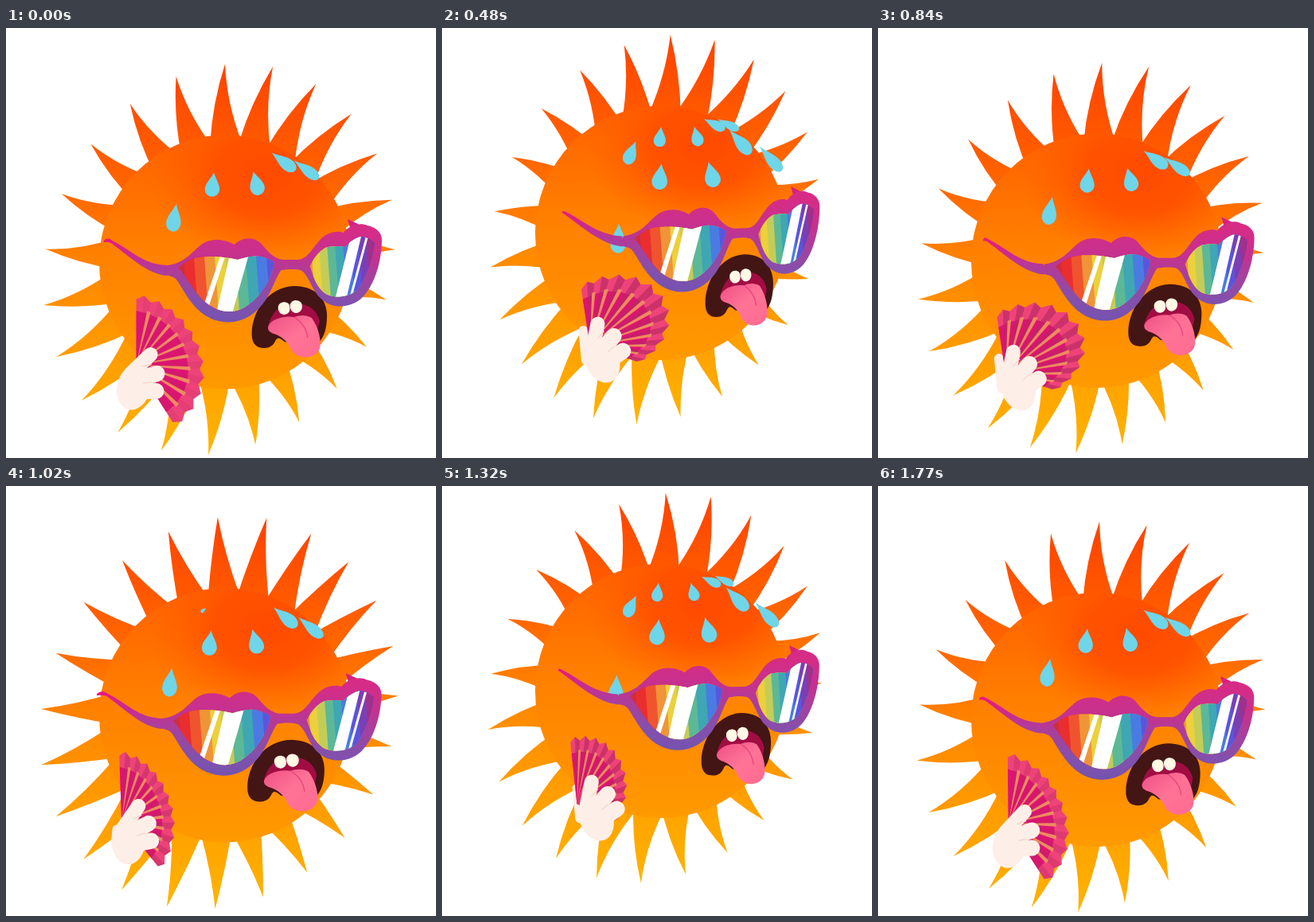
Recreate the animation shown at these times as an HTML page. Size 540 by 540 pixels, loop 1.8 s.

```html
<!DOCTYPE html>
<html lang="en">
<head>
<meta charset="utf-8">
<title>Hot sun</title>
<style>
  html, body { margin: 0; width: 100%; height: 100%; overflow: hidden; background: #fff; }
  svg { display: block; width: 100vw; height: 100vh; }
</style>
</head>
<body>
<svg viewBox="0 0 540 540">
  <defs>
    <linearGradient id="rayFill" gradientUnits="userSpaceOnUse" x1="0" y1="-240" x2="0" y2="240">
      <stop offset="0" stop-color="#ff4400"/>
      <stop offset=".3" stop-color="#ff6500"/>
      <stop offset=".55" stop-color="#ff8a00"/>
      <stop offset="1" stop-color="#ffb400"/>
    </linearGradient>
    <linearGradient id="bodyFill" gradientUnits="userSpaceOnUse" x1="0" y1="-160" x2="0" y2="160">
      <stop offset="0" stop-color="#ff6000"/>
      <stop offset=".45" stop-color="#ff8000"/>
      <stop offset="1" stop-color="#ff9a00"/>
    </linearGradient>
    <radialGradient id="heat" gradientUnits="userSpaceOnUse" cx="0" cy="0" r="1"
        gradientTransform="translate(328 -108) scale(150 110)">
      <stop offset="0" stop-color="#ff4a00"/>
      <stop offset=".45" stop-color="#ff4e00" stop-opacity=".85"/>
      <stop offset="1" stop-color="#ff6000" stop-opacity="0"/>
    </radialGradient>
    <linearGradient id="frameFill" gradientUnits="userSpaceOnUse" x1="0" y1="-40" x2="0" y2="76">
      <stop offset="0" stop-color="#d62c86"/>
      <stop offset=".3" stop-color="#c4328f"/>
      <stop offset=".75" stop-color="#8450ac"/>
      <stop offset="1" stop-color="#7453b0"/>
    </linearGradient>
    <linearGradient id="armFill" gradientUnits="userSpaceOnUse" x1="0" y1="-30" x2="0" y2="18">
      <stop offset="0" stop-color="#ec1580"/>
      <stop offset="1" stop-color="#a244a2"/>
    </linearGradient>
    <linearGradient id="tongueFill" x1="0" y1="0" x2="1" y2="1">
      <stop offset="0" stop-color="#ee4f86"/>
      <stop offset=".5" stop-color="#ff7396"/>
      <stop offset="1" stop-color="#ff6a90"/>
    </linearGradient>
    <clipPath id="lensClip0"><path id="lensShape0"/></clipPath>
    <clipPath id="lensClip1"><path id="lensShape1"/></clipPath>
  </defs>
  <g id="sun">
    <path id="rays" fill="url(#rayFill)"/>
    <ellipse cx="275" cy="0" rx="158" ry="159.5" fill="url(#bodyFill)"/>
    <ellipse cx="275" cy="0" rx="158" ry="159.5" fill="url(#heat)"/>
    <g id="drops" fill="#6fd5e8"></g>
    <g id="mouth"></g>
    <path id="arm" fill="url(#armFill)"/>
    <g id="glasses"></g>
    <g id="fan">
      <path id="thumb" stroke="#fdeee6" stroke-width="12" stroke-linecap="round"/>
      <path id="leaf" fill="#ee4379"/>
      <path id="silk" fill="#dc1472"/>
      <path id="folds" fill="#b82862"/>
      <path id="ribs" fill="#ee8a60"/>
      <g id="hand" fill="#fdefe7" stroke="#fdefe7" stroke-linecap="round">
        <ellipse cx="-8" cy="9" rx="21" ry="29" transform="rotate(14 -8 9)" stroke="none"/>
        <path d="M-12-8L13-32" stroke-width="18"/>
        <path d="M-8 0L21-8M-8 14L20 14" stroke-width="20"/>
        <path d="M3-17Q8-19 14-20M4 4Q9 3 14 3" stroke="#f6d9cf" stroke-width="1.5" fill="none"/>
      </g>
    </g>
  </g>
</svg>
<script>
const LOOP = 1800, STEP = 30, RAYS = 23, PLEATS = 11;
const $ = id => document.getElementById(id);
const rad = deg => deg * Math.PI / 180;
const sin = deg => Math.sin(rad(deg)), cos = deg => Math.cos(rad(deg));
const pt = (x, y) => `${x.toFixed(2)} ${y.toFixed(2)} `;

function add(parent, attrs) {
  const el = document.createElementNS('http://www.w3.org/2000/svg', 'path');
  for (const name in attrs) el.setAttribute(name, attrs[name]);
  return parent.appendChild(el);
}

// Face paths follow the turn of the head: the right side moves less sideways and rises.
const warped = [];
function addWarped(parent, d, fill, extra = {}) {
  warped.push([add(parent, { fill, ...extra }), d]);
}
function warp(d, turn) {
  const k = turn + .62;
  return d.replace(/(-?[\d.]+) (-?[\d.]+)/g, (_, x, y) => {
    const away = Math.max(0, x - 215) / 270;
    return pt(+x + 17.5 * k * (1 - away * away), y - 4 * k * away);
  });
}

const mouth = $('mouth');
addWarped(mouth, 'M309 90 C309 62 330 31 362 30 C392 30 406 50 403 74 C402 88 398 98 388 106 L350 100 C343 94 341 94 338 100 C334 108 326 109 318 107 C311 104 309 98 309 90Z', '#431515');
addWarped(mouth, 'M329 82 C333 66 342 53 360 52 C378 51 390 58 394 74 L390 92 L335 90Z', '#a10d43');
addWarped(mouth, 'M342 57 C342 51 350 48 355 52 C358 57 358 65 350 66 C345 66 342 62 342 57Z M357 54 C358 47 367 46 371 51 C374 57 371 64 364 64 C359 63 357 59 357 54Z', '#fff9e6');
addWarped(mouth, 'M330 80 C334 71 350 67 362 69 C369 66 378 66 384 70 C393 82 397 100 394 109 C388 122 368 123 359 111 C355 100 346 93 337 90 C331 88 328 85 330 80Z', 'url(#tongueFill)');
addWarped(mouth, 'M362 69 C373 76 378 84 379 95', 'none', { stroke: '#e64a80', 'stroke-width': 1.5 });

const glasses = $('glasses');
const lenses = [
  'M217 7 C230 -4 240 -7 256 -7 C270 -7 282 -5 291 -3 C300 -6 312 -9 320 -7 C328 -5 334 -2 337 0 C334 22 320 44 301 56 C284 67 264 62 248 48 C236 36 228 20 217 7Z',
  'M382 5 C388 -8 396 -16 404 -19 C414 -20 420 -20 426 -19 C432 -26 440 -31 446 -32 C454 -31 460 -28 463 -24 C461 -4 452 20 442 34 C432 44 414 46 402 40 C390 32 386 18 382 5Z'
];
const rainbow = ['#cf2f3a', '#ea2e30', '#f0542e', '#f09438', '#ecd03c', '#c4cc58', '#5cb896', '#3fa6b4', '#4a7be2', '#5a55dc', '#7a3fb4', '#a0308c'];
const glints = [
  'M282 -12 L306 -12 L284 66 L264 66Z M271 -12 L277 -12 L255 56 L248 56Z',
  'M434 -36 L447 -36 L427 48 L413 48Z M453 -36 L456 -36 L434 46 L431 46Z'
];
addWarped(glasses, 'M429 -54 L442 -48 L446 -40 L432 -44Z', '#d81f80');
addWarped(glasses, 'M203 4 C222 2 232 -10 242 -19 C254 -31 274 -30 287 -22 C298 -33 314 -32 322 -22 C330 -12 338 -4 348 -3 L366 -3 C378 -3 384 -16 392 -25 C402 -38 416 -40 424 -37 C432 -48 446 -50 454 -46 C464 -44 472 -38 472 -28 C472 0 462 30 448 44 C434 58 410 60 396 46 C384 36 380 14 370 10 C362 8 352 9 346 10 C338 20 332 46 316 60 C300 76 276 80 256 70 C236 60 226 40 216 24 C212 18 206 17 198 16Z', 'url(#frameFill)');
lenses.forEach((shape, side) => {
  warped.push([$('lensShape' + side), shape]);
  const clip = { 'clip-path': `url(#lensClip${side})` };
  const [left, width, first, count] = side ? [372, 10, 3, 9] : [208, 13, 0, 10];
  for (let i = 0; i < count; i++) {
    const x = left + i * width;
    addWarped(glasses, `M${x} -40 L${x + 40} -40 L${x + 50} 70 L${x + 8} 70Z`, rainbow[first + i], clip);
  }
  addWarped(glasses, glints[side], '#fff', clip);
});

// Sweat drops: phase in degrees of the bounce, each living longer than one bounce.
const DROP = 'M0-.5C.08-.25 .3-.05 .3 .2A.3 .3 0 0 1-.3 .2C-.3-.05-.08-.25 0-.5Z';
const sideTilt = p => -75 + .06 * p;
const drops = [
  { born: 70, gone: 632, size: 36, sway: 10, x: p => 266, y: p => -147.5 + .139 * p, tilt: p => 6 },
  { born: 75, gone: 580, size: 36, sway: 10, x: p => 302 + .052 * p, y: p => -147 + .133 * p, tilt: p => -14 },
  { born: 90, gone: 580, size: 44, sway: 6, thin: .7, x: p => 320 + .09 * p, y: p => -148.5 + .062 * p, tilt: sideTilt },
  { born: 100, gone: 580, size: 46, sway: 5, thin: .6, x: p => 327 + .148 * p, y: p => -159 + .119 * p, tilt: sideTilt },
  { born: 35, gone: 675, size: 41, sway: 10, thin: .86, x: p => 212 + 46 * Math.exp((48 - p) / 150),
    y: p => -132 + .193 * (p - 48) + .0001625 * (p - 48) ** 2, tilt: p => 52 * Math.exp((48 - p) / 170) }
];
for (const drop of drops) drop.els = [0, 360].map(() => add($('drops'), { d: DROP }));

function drawDrops(phase, turn) {
  for (const drop of drops) drop.els.forEach((el, i) => {
    const p = phase + i * 360, age = p - drop.born;
    if (age <= 0 || p >= drop.gone) return el.setAttribute('visibility', 'hidden');
    const size = drop.size * age / (age + 50) * Math.min(1, (drop.gone - p) / 8);
    el.setAttribute('visibility', 'visible');
    el.setAttribute('transform', `translate(${pt(drop.x(p) + drop.sway * turn, drop.y(p))}) rotate(${drop.tilt(p)}) scale(${size * (drop.thin || 1)} ${size})`);
  });
}

// Offset of a ray's tip from the middle of the body.
function rayTip(a, roll, turn) {
  return [
    -1.5 + (215 - 10 * turn) * sin(a) + 15 * roll * cos(a) + 6 * cos(2 * a) + 2 * sin(2 * a),
    -1.5 + (14 * roll - 30) * sin(a) - 243.5 * cos(a) - 4 * cos(2 * a) + 6 * sin(2 * a)
  ];
}

function drawRays(phase, turn) {
  const roll = cos(phase - 253), bend = -sin(phase - 253) * 8;
  let d = '';
  for (let k = 0; k < RAYS; k++) {
    const a = 360 * k / RAYS;
    const [tipX, tipY] = rayTip(a, roll, turn);
    const [baseX, baseY] = rayTip(a, roll * .5, turn).map(v => v * .6);
    const dx = tipX - baseX, dy = tipY - baseY, len = Math.hypot(dx, dy);
    const side = (along, w) => pt(275 + baseX + dx * along - dy / len * w, baseY + dy * along + dx / len * w);
    d += `M${side(0, -20)}Q${side(.5, bend - 9)}${side(1, 0)}Q${side(.5, bend + 9)}${side(0, 20)}Z`;
  }
  $('rays').setAttribute('d', d);
}

function drawArm(turn) {
  const x = 139 + 15 * turn, hook = 10 * Math.max(0, -turn), joint = 213 + 17 * turn;
  $('arm').setAttribute('d',
    `M${pt(x - hook, -27)}Q${pt(x - hook * .3, -30 + 3 * turn)}${pt(x + 4, -27)}` +
    `C${pt(x + 28, -15)}${pt(joint - 30, 3)}${pt(joint, 4)}L${pt(joint, 17)}` +
    `C${pt(joint - 24, 15)}${pt(x + 28, -5)}${pt(x + 4, -23)}Q${pt(x, -26)}${pt(x - hook, -25)}Z`);
}

function drawFan(t, turn) {
  // The fan flaps once every 360 ms, so milliseconds serve as degrees.
  const c = cos(t), s = sin(t), back = (1 - c) / 2;
  const px = -16 + 11 * c + 5 * s, py = -10.5 - 8.5 * c;
  const from = 95 - 5 * c, to = -33 - 24 * c;
  const stretch = .12 + .2 * cos(t - 150), width = .98 + .2 * s;
  const at = (u, r) => {
    const a = from + (to - from) * u;
    const len = r * 85 * (1 + stretch * cos(2 * (a - 40))) * (1 - .28 * back * u);
    return pt(px + width * len * cos(a), py - len * sin(a));
  };
  let leaf = `M${pt(px, py)}`, silk = leaf, folds = '', ribs = '';
  for (let i = 0; i < PLEATS; i++) {
    const u = i / PLEATS, half = (i + .5) / PLEATS, next = (i + 1) / PLEATS;
    leaf += `L${at(u, .96)}L${at(half, 1.03)}L${at(next, .96)}`;
    silk += `L${at(u, .79)}L${at(next, .79)}`;
    folds += `M${at(half, .3)}L${at(half, 1.03)}L${at(next, .96)}L${at(next, .3)}Z`;
    if (i) ribs += `M${pt(px, py)}L${at(u - .012, .82)}L${at(u + .015, .82)}Z`;
  }
  $('leaf').setAttribute('d', leaf + 'Z');
  $('silk').setAttribute('d', silk + 'Z');
  $('folds').setAttribute('d', folds);
  $('folds').setAttribute('opacity', .2 + .5 * Math.sqrt(back));
  $('ribs').setAttribute('d', ribs);
  $('hand').setAttribute('transform', `rotate(${-23 + 23 * c})`);
  $('thumb').setAttribute('d', `M-22 12L${pt(-18 - 10 * back, 6 - 42 * back)}`);
  $('fan').setAttribute('transform', `translate(${pt(184 + 24 * turn, 148)})`);
}

function draw(t) {
  const phase = t / 900 * 360 % 360, turn = cos(phase - 230);
  $('sun').setAttribute('transform', `translate(0 ${275.5 + 18.5 * cos(phase)})`);
  drawRays(phase, turn);
  drawDrops(phase, turn);
  for (const [el, d] of warped) el.setAttribute('d', warp(d, turn));
  drawArm(turn);
  drawFan(t, turn);
}

const start = performance.now();
function tick() {
  const t = (performance.now() - start) % LOOP;
  draw(Math.floor(t / STEP) * STEP);
  requestAnimationFrame(tick);
}
tick();
</script>
</body>
</html>
```
